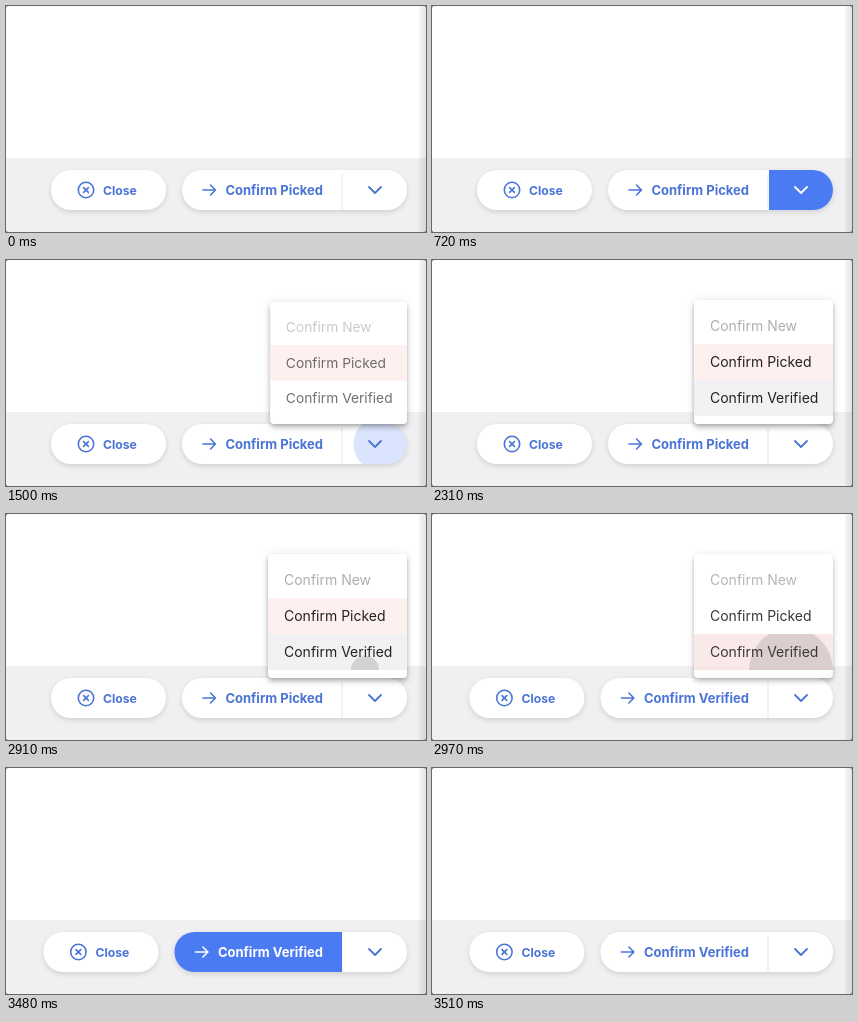
These frames come from a looping animation (420 by 226 pixels, 3.9 s). An HTML page:

```html
<!DOCTYPE html>
<html lang="en">
<head>
<meta charset="utf-8">
<title>Split button menu</title>
<style>
html, body { margin: 0; width: 100%; height: 100%; overflow: hidden; background: #555; }
#stage { position: relative; width: 420px; height: 226px; overflow: hidden; border-radius: 2px;
  background: linear-gradient(#fff 152px, #f0f0f2 152px); font-family: Inter, sans-serif; }
svg { position: absolute; inset: 0; }
svg text { font-weight: 700; fill: currentColor; }
.pill { filter: drop-shadow(0 2px 2.5px rgba(0,0,0,.13)); fill: #fff; }
.icon { fill: none; stroke: currentColor; stroke-width: 1.6; stroke-linecap: round; stroke-linejoin: round; }
g { color: #4a74d6; }
.edge { position: absolute; right: 0; top: 0; width: 7px; height: 100%;
  background: linear-gradient(90deg, rgba(0,0,0,.04), rgba(0,0,0,.1)); }
#menu { position: absolute; left: 262px; top: 40px; width: 139px; height: 108px; padding: 8px 0;
  background: #fff; border-radius: 4px; transform-origin: 100% 100%;
  box-shadow: 0 2px 4px -1px rgba(0,0,0,.2), 0 4px 5px rgba(0,0,0,.14), 0 1px 10px rgba(0,0,0,.12); }
.item { position: relative; height: 36px; line-height: 36px; padding-left: 16px; font-size: 14px;
  color: #222; overflow: hidden; white-space: nowrap; }
.item span { position: relative; }
.off { color: #aeaeae; }
#blot { position: absolute; border-radius: 50%; background: rgba(0,0,0,.13); }
</style>
</head>
<body>
<div id="stage">
  <svg width="420" height="226">
    <clipPath id="whole"><rect id="wholeBox" y="164" height="40" rx="20"/></clipPath>
    <clipPath id="caretClip"><path d="M337 164H381a20 20 0 0 1 0 40H337z"/></clipPath>
    <g id="close">
      <rect class="pill" x="45" y="164" width="115" height="40" rx="20"/>
      <path class="icon" d="M72.3 184a7.7 7.7 0 1 0 15.4 0a7.7 7.7 0 1 0 -15.4 0M77.6 181.6l4.8 4.8m0 -4.8l-4.8 4.8"/>
      <text x="97" y="188.6" font-size="12.2">Close</text>
    </g>
    <rect id="pill" class="pill" y="164" height="40" rx="20"/>
    <rect x="335.5" y="168" width="1" height="36" fill="#e6e6ea"/>
    <g id="main">
      <rect id="mainFill" x="160" y="164" width="176" height="40" fill="#4b7bf3" clip-path="url(#whole)"/>
      <path id="arrow" class="icon" d="M197 184h12.5m-5 -5l5 5l-5 5"/>
      <text id="label" x="317" y="188.7" font-size="13" text-anchor="end"></text>
    </g>
    <g id="caret">
      <g clip-path="url(#caretClip)">
        <rect id="caretFill" x="337" y="164" width="64" height="40" fill="#4b7bf3"/>
        <circle id="ripple" cx="374.5" cy="184" fill="#4b7bf3"/>
      </g>
      <path class="icon" style="stroke-width:1.8" d="M363 181l6 6l6 -6"/>
    </g>
  </svg>
  <div class="edge"></div>
  <div id="menu">
    <div class="item off"><span>Confirm New</span></div>
    <div class="item" id="picked"><span>Confirm Picked</span></div>
    <div class="item" id="verified"><i id="blot"></i><span>Confirm Verified</span></div>
  </div>
</div>
<script>
const LOOP = 3900;
const $ = id => document.getElementById(id);
const texts = document.querySelectorAll('.item span');
// Progress from 0 to 1 between two times
const ramp = (t, a, b) => Math.min(1, Math.max(0, (t - a) / (b - a)));

function hover(name, on) {
  $(name + 'Fill').style.opacity = on ? 1 : 0;
  $(name).style.color = on ? '#fff' : '';
}

function draw(t) {
  const chosen = t >= 2940;
  const shift = chosen ? -7.6 : 0;
  const left = 176 + shift;

  $('close').setAttribute('transform', `translate(${shift})`);
  $('arrow').setAttribute('transform', `translate(${shift})`);
  for (const id of ['pill', 'wholeBox']) {
    $(id).setAttribute('x', left);
    $(id).setAttribute('width', 401 - left);
  }
  $('label').textContent = chosen ? 'Confirm Verified' : 'Confirm Picked';

  hover('caret', t >= 720 && t < 1430);
  hover('main', t >= 3480 && t < 3510);
  $('ripple').setAttribute('r', t < 1350 ? 0 : 27 * ramp(t, 1320, 1500) + 14 * ramp(t, 1500, 1700));
  $('ripple').style.opacity = .2 * (1 - ramp(t, 1510, 1700));

  const menu = $('menu').style;
  menu.visibility = t >= 1420 && t < 3085 ? 'visible' : 'hidden';
  menu.opacity = ramp(t, 1410, 1470) * (1 - ramp(t, 2958, 3085));
  menu.transform = `scale(${1 - .2 * (1 - ramp(t, 1420, 1540)) ** 2.3})`;
  texts.forEach(s => s.style.opacity = ramp(t, 1420, 1545));
  $('picked').style.background = chosen ? '' : '#fdf0ef';
  $('verified').style.background = chosen ? '#f9e7e6' : t >= 1680 ? '#f1f1f4' : '';

  const r = t < 2900 ? 0 : 42 * ramp(t, 2880, 2970) + 24 * ramp(t, 2970, 3085);
  Object.assign($('blot').style, {
    left: 97 - r + 'px', top: 36 - r + 'px', width: 2 * r + 'px', height: 2 * r + 'px'
  });
}

function tick() {
  draw(performance.now() % LOOP);
  requestAnimationFrame(tick);
}
tick();
</script>
</body>
</html>
```
